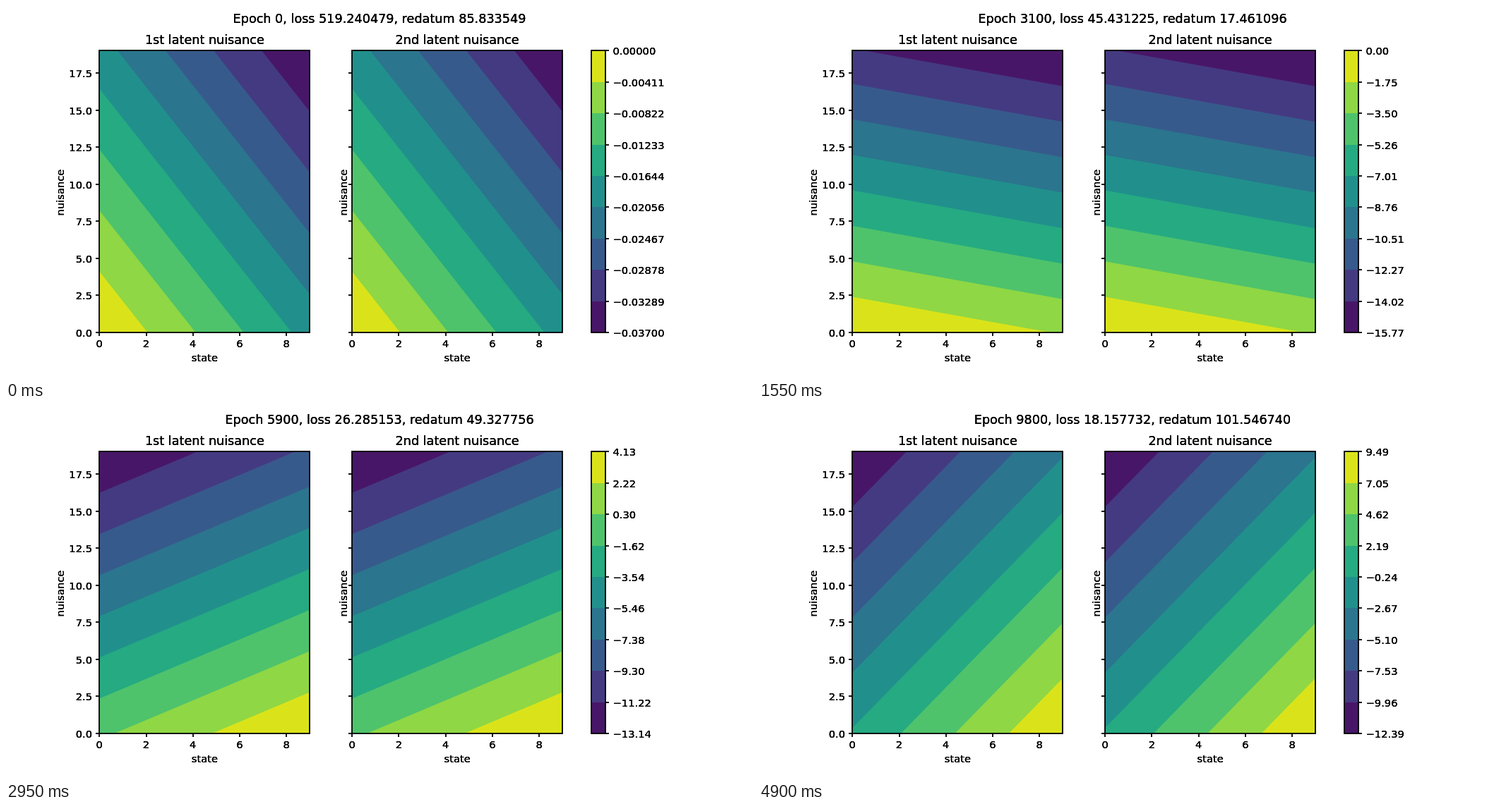
Write an HTML page with a canvas that moves like this. It is 1058 px wide and 529 px high and loops after 4.95 s.

```html
<!DOCTYPE html>
<html>
<head>
<meta charset="utf-8">
<style>
html, body { margin: 0; height: 100%; overflow: hidden; background: #fff; }
canvas { display: block; }
</style>
</head>
<body>
<canvas id="stage" width="1058" height="529"></canvas>
<script>
const ctx = document.getElementById('stage').getContext('2d');
const STEP = 50, STEPS = 99, BANDS = 9;
const TOP = 63.48, BOTTOM = 462.88, HEIGHT = BOTTOM - TOP, WIDTH = 298.16;
const UX = WIDTH / 9, UY = HEIGHT / 19;
const SMALL = 14.69, LARGE = 17.63;
const COLORS = ['#dae31a', '#8fd744', '#4ec36b', '#25aa82', '#21908c',
  '#2b758e', '#375a8c', '#443a82', '#481668'];

// Training milestones: epoch, slope along state, slope along nuisance, loss, redatum
const KEYS = [
  [0, -0.002, -0.001, 519.240479, 85.833549],
  [1400, -0.80929, -0.6229, 67.500648, 20.577428],
  [3100, -0.20739, -0.7318, 45.431225, 17.461096],
  [5100, 0.29333, -0.70895, 30.580709, 38.224276],
  [6700, 0.60958, -0.67544, 23.098473, 61.218834],
  [8300, 0.86906, -0.65484, 19.390890, 83.754436],
  [9800, 1.05391, -0.65216, 18.157732, 101.546740]
];

// Learning slows down, so curves are smooth in logarithmic time
const warp = epoch => Math.log(1 + epoch / 300);
const times = KEYS.map(k => warp(k[0]));

// Smooth curve through the values, with parabolic tangents
function curve(values) {
  const last = values.length - 1;
  const gap = i => times[i + 1] - times[i];
  const slope = i => (values[i + 1] - values[i]) / gap(i);
  const inner = i => (gap(i) * slope(i - 1) + gap(i - 1) * slope(i)) / (gap(i) + gap(i - 1));
  const tangent = i => i === 0 ? 1.5 * slope(0) - inner(1) / 2
    : i === last ? 1.5 * slope(last - 1) - inner(last - 1) / 2 : inner(i);
  return epoch => {
    const x = warp(epoch);
    let i = 0;
    while (i < last - 1 && x >= times[i + 1]) i++;
    const u = (x - times[i]) / gap(i), v = 1 - u;
    return values[i] * v * v * (1 + 2 * u) + values[i + 1] * u * u * (3 - 2 * u)
      + gap(i) * u * v * (tangent(i) * v - tangent(i + 1) * u);
  };
}

const column = c => KEYS.map(k => k[c]);
const logCurve = values => {
  const f = curve(values.map(Math.log));
  return epoch => Math.exp(f(epoch));
};
const stateSlope = curve(column(1)), nuisanceSlope = curve(column(2));
const lossAt = logCurve(column(3)), redatumAt = logCurve(column(4));

// Repeated fills darken the soft edges of the letters
function text(str, x, y, size = SMALL, align = 'center') {
  ctx.font = size + 'px "DejaVu Sans", sans-serif';
  ctx.textAlign = align;
  for (let i = 0; i < 3; i++) ctx.fillText(str, x, y);
}

function line(x1, y1, x2, y2) {
  ctx.beginPath();
  ctx.moveTo(x1, y1);
  ctx.lineTo(x2, y2);
  ctx.stroke();
}

function frame(x, w) {
  const left = Math.round(x), top = Math.round(TOP);
  ctx.strokeRect(left, top, Math.round(x + w) - left, Math.round(BOTTOM) - top);
}

function bands(x, a, b, levels) {
  const edge = (level, state) => BOTTOM - (level - a * state) / b * UY;
  ctx.save();
  ctx.beginPath();
  ctx.rect(x, TOP, WIDTH, HEIGHT);
  ctx.clip();
  COLORS.forEach((color, i) => {
    const left = i ? edge(levels[i], 0) : BOTTOM;
    const right = i ? edge(levels[i], 9) : BOTTOM;
    const top = Math.min(TOP, left, right);
    ctx.fillStyle = color;
    ctx.beginPath();
    ctx.moveTo(x, left);
    ctx.lineTo(x + WIDTH, right);
    ctx.lineTo(x + WIDTH, top);
    ctx.lineTo(x, top);
    ctx.fill();
  });
  ctx.restore();
}

function plot(x, title, labelX, numbered) {
  const left = Math.round(x), bottom = Math.round(BOTTOM);
  frame(x, WIDTH);
  for (let s = 0; s <= 8; s += 2) {
    const tx = Math.round(x + s * UX);
    line(tx, bottom, tx, bottom + 5);
    text(s, x + s * UX, 484);
  }
  for (let n = 0; n < 19; n += 2.5) {
    const ty = Math.round(BOTTOM - n * UY);
    line(left - 5, ty, left, ty);
    if (numbered) text(n.toFixed(1), left - 10, ty + 6, SMALL, 'right');
  }
  text(title, x + WIDTH / 2, 54, LARGE);
  text('state', x + WIDTH / 2, 504);
  ctx.save();
  ctx.translate(labelX, 264.5);
  ctx.rotate(-Math.PI / 2);
  text('nuisance', 0, 0);
  ctx.restore();
}

function colorbar(levels) {
  const x = 829.2, w = 20, right = Math.round(x + w);
  const levelY = i => Math.round(TOP + i * HEIGHT / BANDS);
  COLORS.forEach((color, i) => {
    ctx.fillStyle = color;
    ctx.fillRect(x, levelY(i), w, levelY(i + 1) - levelY(i));
  });
  ctx.fillStyle = '#000';
  frame(x, w);
  const digits = 3 - Math.floor(Math.log10(levels[0] - levels[BANDS]));
  levels.forEach((v, i) => {
    const y = levelY(i);
    line(right, y, right + 5, y);
    text(v.toFixed(digits).replace('-', '\u2212'), 859.5, y + 6, SMALL, 'left');
  });
}

function draw(now) {
  const epoch = Math.floor(now / STEP) % STEPS * 100;
  const a = stateSlope(epoch), b = nuisanceSlope(epoch);
  const max = Math.max(0, 9 * a), min = Math.min(0, 9 * a) + 19 * b;
  const levels = Array.from({ length: BANDS + 1 }, (_, i) => max + (min - max) * i / BANDS);
  const loss = lossAt(epoch).toFixed(6), redatum = redatumAt(epoch).toFixed(6);
  const x1 = 132.25, x2 = 490.05;

  ctx.fillStyle = '#fff';
  ctx.fillRect(0, 0, 1058, 529);
  ctx.strokeStyle = '#000';
  ctx.lineWidth = 1.8;
  bands(x1, a, b, levels);
  bands(x2, a, b, levels);
  colorbar(levels);
  plot(x1, '1st latent nuisance', 82, true);
  plot(x2, '2nd latent nuisance', 483, false);
  text(`Epoch ${epoch}, loss ${loss}, redatum ${redatum}`, 529, 24, LARGE);
}

let start;
function tick(now) {
  start ??= now;
  draw(Math.max(0, now - start));
  requestAnimationFrame(tick);
}
draw(0);
requestAnimationFrame(tick);
</script>
</body>
</html>
```
